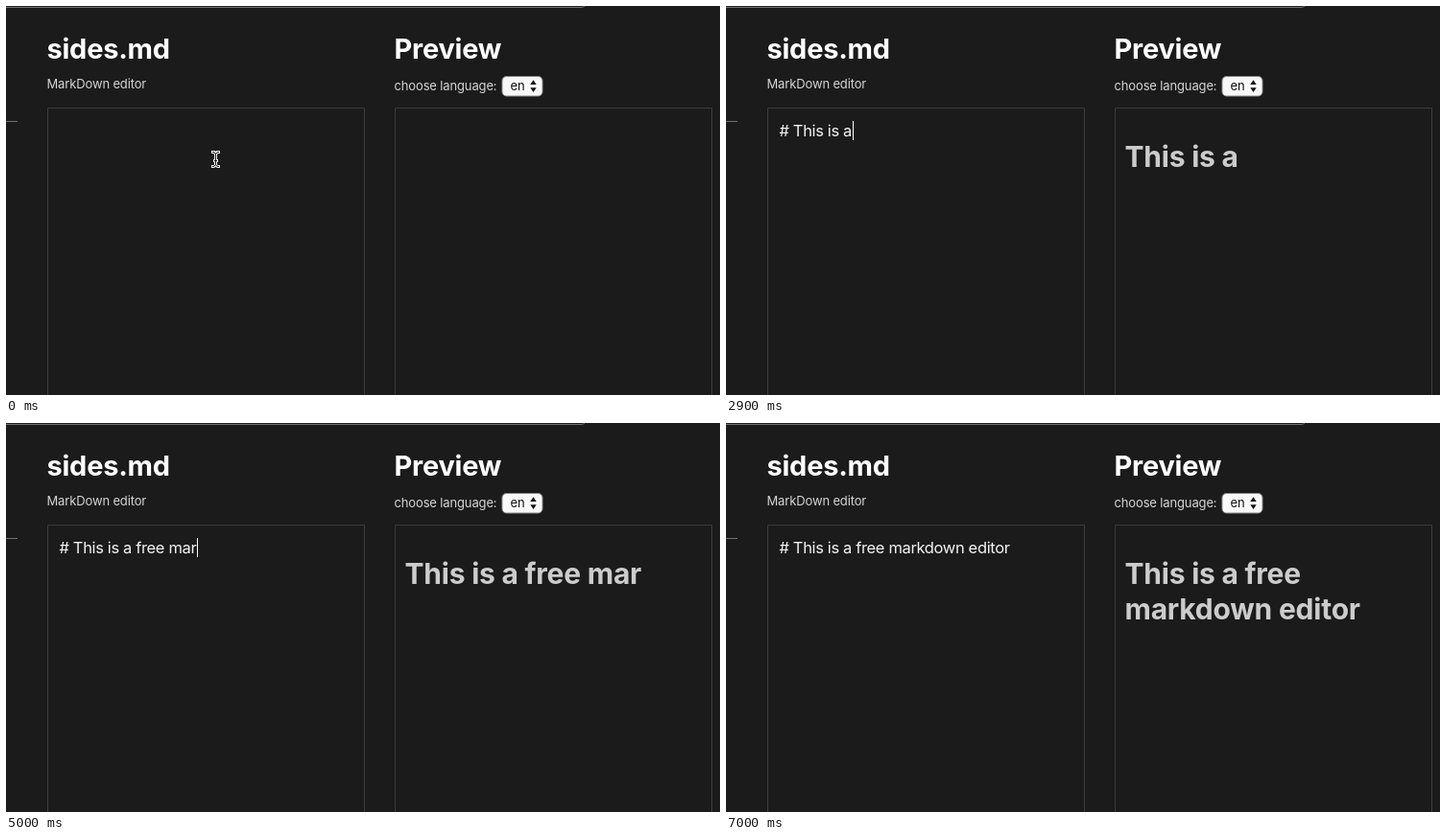
These frames come from a looping animation (744x406 px, 7200 ms). An HTML page:

```html
<!DOCTYPE html>
<html lang="en">
<head>
<meta charset="utf-8">
<title>Markdown editor</title>
<style>
  html, body { margin: 0; width: 100%; height: 100%; overflow: hidden; background: #1b1b1b; }
  body {
    position: relative;
    font-family: Inter, "Open Sans", sans-serif;
    font-optical-sizing: none;
  }
  svg { position: absolute; left: 0; top: 0; }
  .title { font-size: 29px; font-weight: 700; letter-spacing: -.25px; fill: #fff; }
  .label { font-size: 13px; letter-spacing: -.14px; fill: #d6d6d6; }
  .line { fill: none; stroke: #3b3b3b; }
  .rule { fill: none; stroke: #707070; }
  #editor {
    position: absolute; left: 55.5px; top: 120px;
    font-size: 16.5px; line-height: 20px; letter-spacing: -.36px;
    color: #f4f4f4; white-space: pre;
  }
  #caret {
    display: inline-block; vertical-align: top;
    width: 1px; height: 20px; margin-left: 1px; background: #fff;
  }
  #preview {
    position: absolute; left: 415.5px; top: 139px; width: 289px;
    font-size: 30px; font-weight: 700; line-height: 37px; letter-spacing: -.22px;
    color: #ccc;
  }
</style>
</head>
<body>
<svg width="744" height="406" viewBox="0 0 744 406">
  <path class="rule" d="M0 1.5H599Q602 1.5 603 0M0 120.5H12"/>
  <path class="line" d="M43.5 406V106.5H373.5V406M405.5 406V106.5H735.5V406"/>
  <text class="title" x="42.5" y="55">sides.md</text>
  <text class="title" x="404.5" y="55">Preview</text>
  <text class="label" x="42.5" y="86">MarkDown editor</text>
  <text class="label" x="404.5" y="88">choose language:</text>
  <rect x="517" y="73.5" width="42" height="20.5" rx="4.5" fill="#f8f8f8" stroke="#8a8a8a"/>
  <text class="label" x="525.5" y="88" style="fill:#111">en</text>
  <path d="M546.3 82L549.5 77.2L552.7 82ZM546.3 85.2H552.7L549.5 90Z" fill="#111"/>
  <g id="mouse" fill="none" stroke-linecap="square">
    <path id="beam" d="M215.5 152.5Q218 152.5 218.5 154.5Q219 152.5 221.5 152.5M218.5 154.5V165.5M215.5 167.5Q218 167.5 218.5 165.5Q219 167.5 221.5 167.5M217.5 161.5H219.5" stroke="#f2f2f2" stroke-width="2.8"/>
    <use href="#beam" id="core"/>
    <path d="M215.5 152.5Q218 152.5 218.5 154.5Q219 152.5 221.5 152.5M218.5 154.5V165.5M215.5 167.5Q218 167.5 218.5 165.5Q219 167.5 221.5 167.5M217.5 161.5H219.5" stroke="#1b1b1b"/>
  </g>
</svg>
<div id="editor"><span id="typed"></span><i id="caret"></i></div>
<div id="preview"></div>
<script>
  const LOOP = 7200, CARET_ON = 500, CARET_OFF = 6900;
  const TEXT = "# This is a free markdown editor";
  // moment each character is typed, in ms
  const KEYS = [
    900, 1200, 1600, 1800, 1900, 2000, 2100, 2200, 2300, 2500, 2900, 3100,
    3500, 3700, 4100, 4300, 4500, 4600, 4700, 5000, 5100, 5200, 5400, 5500, 5600,
    5900, 5900, 6000, 6200, 6300, 6300, 6400
  ];
  const $ = id => document.getElementById(id);
  const show = (el, on) => { el.style.visibility = on ? "visible" : "hidden"; };
  const typed = $("typed"), preview = $("preview"), caret = $("caret"), mouse = $("mouse");
  const start = performance.now();
  let shown = -1;

  function draw(t) {
    const count = KEYS.filter(k => k <= t).length;
    if (count !== shown) {
      shown = count;
      typed.textContent = TEXT.slice(0, count);
      preview.textContent = TEXT.slice(2, Math.max(2, count));
    }
    show(caret, t >= CARET_ON && t < CARET_OFF);
    show(mouse, t < KEYS[0]);
  }

  function tick() {
    draw((performance.now() - start) % LOOP);
    requestAnimationFrame(tick);
  }
  tick();
</script>
</body>
</html>
```
